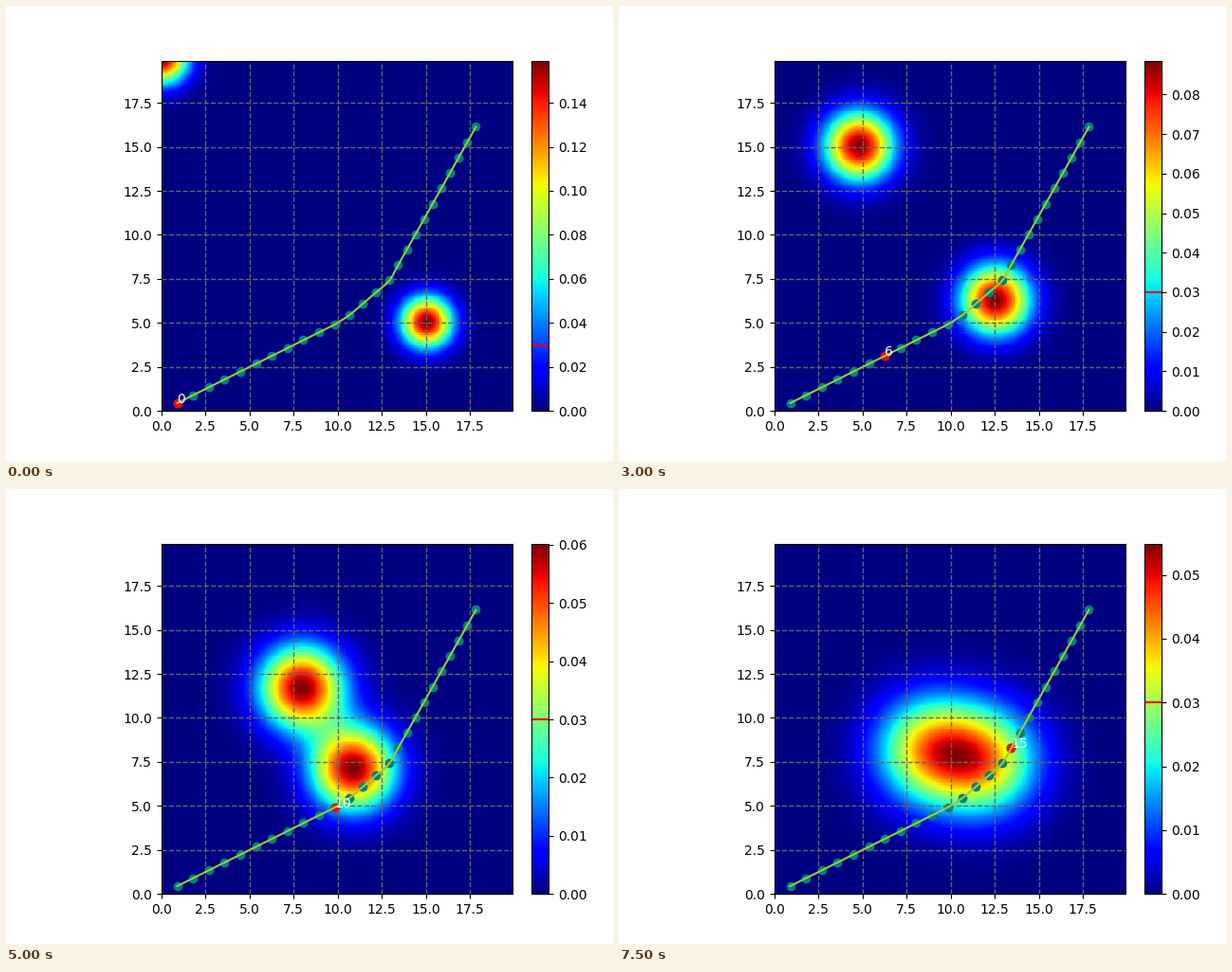
A matplotlib script for the animation above (8 s loop, 640 by 480 pixels).

```python
import numpy as np
import matplotlib.pyplot as plt
from matplotlib.animation import FuncAnimation

W, H, DPI = 640, 480, 100
FRAMES, INTERVAL = 16, 500
STEPS = 24          # steps for an obstacle's full crossing
GROWTH = 1.05       # spread of the position estimate per step
THRESHOLD = 0.03

axis = np.arange(200) * 0.1
gx, gy = np.meshgrid(axis, axis)

# (start, end) of each moving obstacle
OBSTACLES = [((0, 20), (19, 0)), ((15, 5), (5, 10))]


def density(i):
    var = GROWTH ** (2 * i)
    total = np.zeros_like(gx)
    for start, end in OBSTACLES:
        cx, cy = np.array(start) + (np.array(end) - start) * i / STEPS
        d2 = (gx - cx) ** 2 + (gy - cy) ** 2
        total += np.exp(-d2 / (2 * var)) / (2 * np.pi * var)
    return total[:-1, :-1]


def waypoints():
    first = np.arange(1, 12)[:, None] * np.array([2, 1]) / np.sqrt(5)
    bend = [(10.68, 5.46), (11.43, 6.09), (12.19, 6.75), (12.94, 7.42)]
    last = np.array([13.43, 8.28]) + np.arange(10)[:, None] * [0.491, 0.873]
    return np.vstack([first, bend, last])


def smooth(pts, n=10):
    """Catmull-Rom curve through the points."""
    p = np.vstack([2 * pts[0] - pts[1], pts, 2 * pts[-1] - pts[-2]])
    t = np.linspace(0, 1, n, endpoint=False)[:, None]
    parts = []
    for a, b, c, d in zip(p, p[1:], p[2:], p[3:]):
        parts.append(b + 0.5 * t * (c - a + t * (2 * a - 5 * b + 4 * c - d
                                    + t * (3 * (b - c) + d - a))))
    return np.vstack(parts + [pts[-1:]])


fig = plt.figure(figsize=(W / DPI, H / DPI), dpi=DPI)
side, bar, gap = 0.77 * H, 0.77 * H / 20, 20
left = 0.575 * W - (side + gap + bar) / 2
ax = fig.add_axes([left / W, 0.11, side / W, 0.77])
cax = fig.add_axes([(left + side + gap) / W, 0.11, bar / W, 0.77])

mesh = ax.pcolormesh(axis, axis, density(0), cmap="jet", shading="flat")
ax.set(xlim=(0, axis[-1]), ylim=(0, axis[-1]))
ax.grid(color="#666666", linestyle="--", linewidth=1)
fig.colorbar(mesh, cax=cax)
cax.axhline(THRESHOLD, color="r")

route = waypoints()
ax.scatter(*route.T, color="teal")
ax.plot(*smooth(route).T, color="yellowgreen")
robot = ax.scatter(*route[:1].T, color="red")
label = ax.text(*route[0], "0", color="white")


def update(i):
    z = density(i)
    mesh.set_array(z)
    mesh.set_clim(z.min(), z.max())
    robot.set_offsets(route[i:i + 1])
    label.set_position(route[i])
    label.set_text(str(i))
    return mesh, robot, label


anim = FuncAnimation(fig, update, frames=FRAMES, interval=INTERVAL,
                     init_func=lambda: update(0), repeat=True, repeat_delay=0)
plt.show()
```
